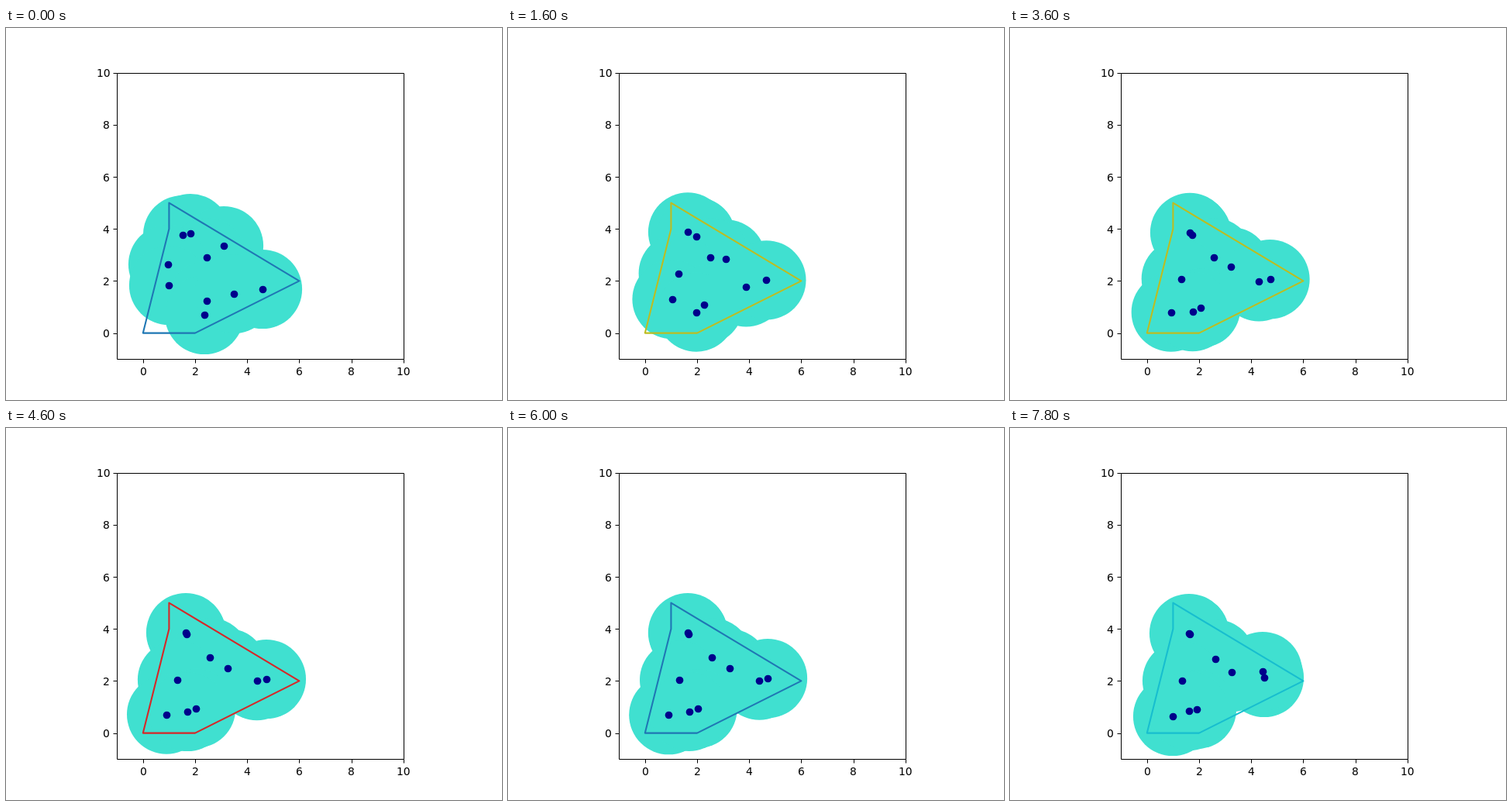
Recreate the animation shown at these times as an HTML page. Size 640x480 px, loop 8 s.

```html
<!DOCTYPE html>
<html lang="en">
<head>
<meta charset="utf-8">
<title>Coverage plot</title>
<style>
  html, body { margin: 0; width: 100%; height: 100%; overflow: hidden; background: #fff; }
  svg { display: block; width: 640px; height: 480px; }
  text { font: 13.89px "DejaVu Sans", sans-serif; }
  #discs { fill: #40e0d0; }
  #dots { fill: #00008b; }
  #region { fill: none; stroke-width: 2.08; stroke-linejoin: round; }
  #axes path { fill: none; stroke: #000; stroke-width: 1; }
</style>
</head>
<body>
<svg viewBox="0 0 640 480">
  <g id="discs"></g>
  <path id="region"/>
  <g id="dots"></g>
  <g id="axes"><path d="M143.5 58.5H513.5V427.5H143.5Z"/></g>
</svg>
<script>
const STEP_MS = 200, STEPS = 40, UNIT = 33.6, DIGIT = 8.4;
const DISC_RADIUS = 51.1, DOT_RADIUS = 4.85;
const CYCLE = ['#1f77b4', '#ff7f0e', '#2ca02c', '#d62728', '#9467bd',
               '#8c564b', '#e377c2', '#7f7f7f', '#bcbd22', '#17becf'];
const px = x => 176.8 + x * UNIT;
const py = y => 393.6 - y * UNIT;
const $ = id => document.getElementById(id);

// The sites spread out, settle slowly, then begin to drift again.
const phases = [
  { from: 0, to: 4, ease: u => u },
  { from: 4, to: 26, ease: u => 1 - (1 - u) ** 2.2 },
  { from: 26, to: 39, ease: u => u * u }
];

// Way points of each site: start, spread, settled, drifted.
const paths = [
  '228,267 232,263 232,264 231,265',
  '238,265 248,271 233,266 232,266',
  '281,281 279,292 286,310 286,315',
  '259,296 260,296 263,296 265,298',
  '209,305 219,312 221,325 222,326',
  '210,332 214,339 207,370 210,372',
  '259,352 257,355 245,362 241,363',
  '256,370 248,367 234,366 231,365',
  '294,343 298,339 324,326 328,322',
  '331,337 332,326 336,324 326,314'
];

function add(parent, tag, attrs, text = '') {
  const node = document.createElementNS('http://www.w3.org/2000/svg', tag);
  for (const name in attrs) node.setAttribute(name, attrs[name]);
  node.textContent = text;
  return parent.appendChild(node);
}

function place(circle, x, y) {
  circle.setAttribute('cx', x);
  circle.setAttribute('cy', y);
}

function addLabel(value, x, y) {
  add($('axes'), 'text', { x: Math.round(x), y: Math.round(y) }, value);
}

for (let v = 0; v <= 10; v += 2) {
  const x = Math.round(px(v)) + 0.5, y = Math.round(py(v)) + 0.5;
  const width = DIGIT * String(v).length;
  add($('axes'), 'path', { d: `M${x} 427.5V432.5M143.5 ${y}H138.5` });
  addLabel(v, px(v) - width / 2, 448);
  addLabel(v, 133.5 - width, py(v) + 5.5);
}

const corners = [[0, 0], [2, 0], [6, 2], [1, 5], [1, 4]];
$('region').setAttribute('d', 'M' + corners.map(([x, y]) => [px(x), py(y)]).join('L') + 'Z');

const sites = paths.map(path => ({
  points: path.split(' ').map(point => point.split(',').map(Number)),
  disc: add($('discs'), 'circle', { r: DISC_RADIUS }),
  dot: add($('dots'), 'circle', { r: DOT_RADIUS })
}));

function draw(step) {
  const i = phases.findIndex(phase => step <= phase.to);
  const { from, to, ease } = phases[i];
  const u = ease((step - from) / (to - from));
  for (const { points, disc, dot } of sites) {
    const [x, y] = points[i].map((v, axis) => v + (points[i + 1][axis] - v) * u);
    place(disc, x, y);
    place(dot, Math.round(x) + 0.5, Math.round(y) + 0.5);
  }
  $('region').setAttribute('stroke', CYCLE[step % CYCLE.length]);
}

const start = performance.now();
function tick() {
  const elapsed = Math.max(0, performance.now() - start);
  draw(Math.floor(elapsed / STEP_MS) % STEPS);
  requestAnimationFrame(tick);
}
tick();
</script>
</body>
</html>
```
